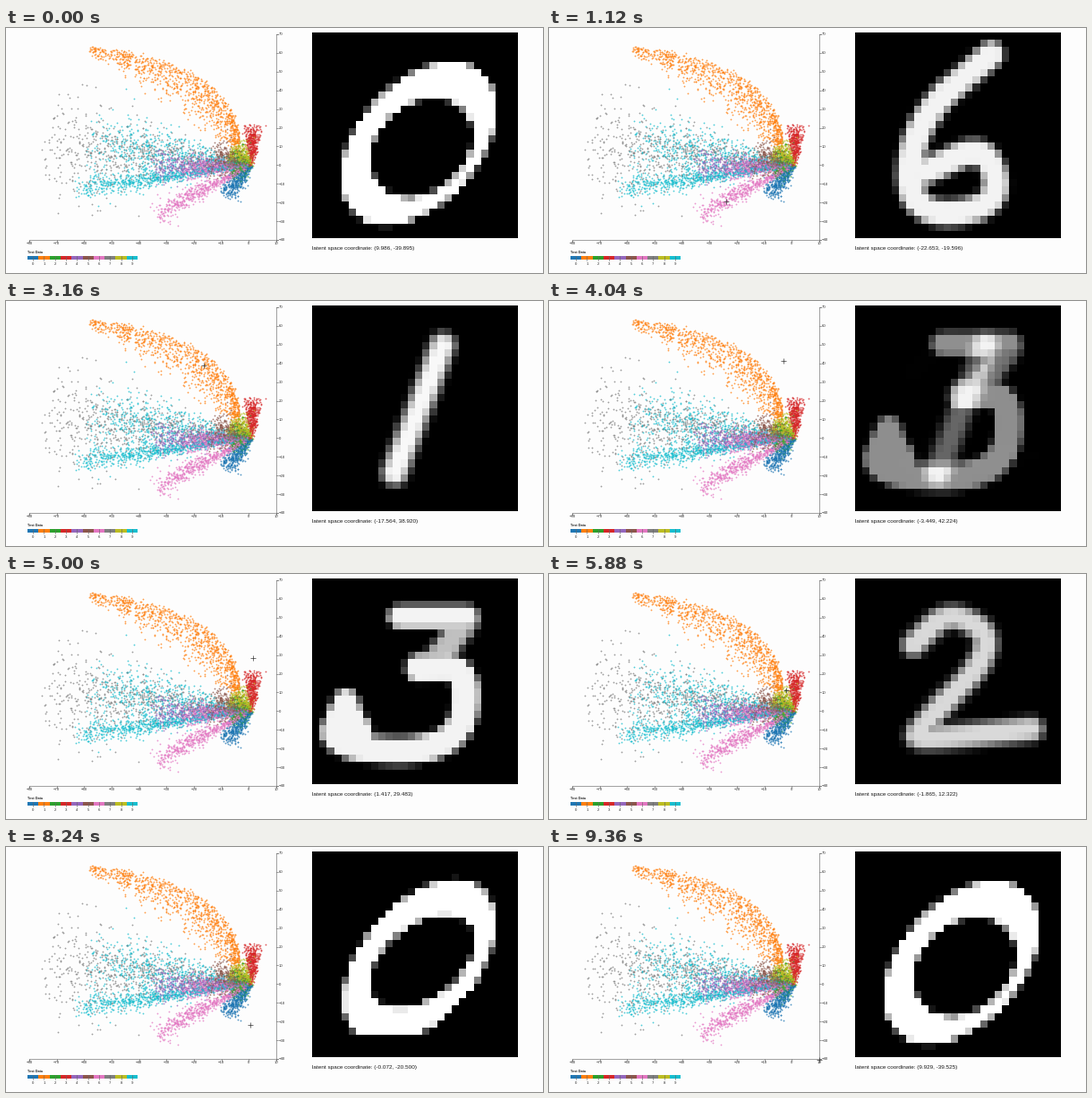
A matplotlib script for the animation above (9400 ms loop, 600x274 px).

```python
import numpy as np
import matplotlib.pyplot as plt
from matplotlib.animation import FuncAnimation
from matplotlib.patches import Rectangle

W, H, DPI = 600, 274, 64
STEP, LOOP = 40, 9400
PX = 72 / DPI
INK = "#2b2b2b"
COLORS = [plt.cm.tab10(d) for d in range(10)]

plt.rcParams["font.family"] = "Liberation Sans"
rng = np.random.default_rng(7)

fig = plt.figure(figsize=(W / DPI, H / DPI), dpi=DPI, facecolor="#fdfdfd")
ax = fig.add_axes([0, 0, 1, 1])
ax.axis("off")


def px(x):
    return 26 + (x + 80) * 276 / 90


def py(y):
    return 237 - (y + 40) * 230 / 110


def line(xs, ys):
    ax.plot(xs, ys, color="#666666", lw=0.6 * PX)


def label(x, y, text, size=4.3, color=INK, **kw):
    return ax.text(x, y, text, fontsize=size * PX, color=color, **kw)


# ---------- scatter plot ----------
def fan(angle, spread, reach):
    """Cloud that radiates leftwards from the dense core; angle in degrees."""
    n = int(300 + 1.6 * reach)
    a = np.radians(rng.normal(angle, spread, n))
    r = reach * rng.beta(1.6, 1.4, n)
    pts = np.column_stack([274 - r * np.cos(a), 153 - r * np.sin(a)])
    return pts + rng.normal(0, 1.2, (n, 2))


def arch(n):
    """Cloud below a quadratic curve, densest along its outer edge."""
    t = rng.beta(1.1, 1.2, n)[:, None]
    edge = (1 - t) ** 2 * [94, 22] + 2 * t * (1 - t) * [262, 38] + t ** 2 * [260, 132]
    depth = (5 + 200 * t * (1 - t)) * rng.beta(1, 2.3, (n, 1))
    return edge + depth * [-0.5, 0.85] + rng.normal(0, 1.2, (n, 2))


clouds = [(1, arch(1000))] + [
    (digit, fan(angle, spread, reach)) for digit, angle, spread, reach in [
        (0, -50, 9, 46), (2, 5, 28, 27), (3, 92, 8, 46), (4, -1, 6, 112),
        (5, 12, 16, 50), (6, -27, 3.5, 122), (6, -4, 5, 80), (7, 5, 7.5, 235),
        (8, 45, 20, 30), (9, 7, 8, 185), (9, -8, 2, 200)]]

# A few shuffled layers per class let the colours interleave.
LAYERS = 5
for layer in range(LAYERS):
    for k in rng.permutation(len(clouds)):
        digit, pts = clouds[k]
        x, y = pts[layer::LAYERS].T
        ax.plot(x, y, "o", ms=1.8 * PX, mew=0, color=COLORS[digit], alpha=0.75)

line([26, 26, 302, 302], [239, 237, 237, 239])
line([304, 302, 302, 304], [7, 7, 237, 237])
for v in range(-80, 11, 10):
    line([px(v)] * 2, [237, 239])
    label(px(v), 241.4, str(v).replace("-", "\u2212"), ha="center", va="center")
for v in range(-40, 71, 10):
    line([302, 304], [py(v)] * 2)
    label(305, py(v), str(v).replace("-", "\u2212"), va="center_baseline")

label(24, 252.3, "Test Data", 3.9, weight="bold")
CELL = 12.3
for d, c in enumerate(COLORS):
    x = 24 + d * CELL
    ax.add_patch(Rectangle((x, 254.5), CELL, 4, fc=c, ec="none"))
    line([x + CELL / 2] * 2, [254.5, 260])
    label(x + CELL / 2, 263.6, str(d), ha="center", va="center")

# ---------- decoded digits ----------
N, SUB = 28, 4
row, col = np.mgrid[0:N, 0:N] + 0.5
fine_y, fine_x = (np.mgrid[0:N * SUB, 0:N * SUB] + 0.5) / SUB


def oval(cx, cy, a, b, lean):
    u, v = (fine_x - cx) / a, (cy - fine_y) / b
    inside = u * u + v * v - 2 * lean * u * v < 1 - lean * lean
    return inside.reshape(N, SUB, N, SUB).mean(axis=(1, 3))


def ring(outer, hole, floor):
    return np.clip((oval(*outer) - oval(*hole) - 0.2) / 0.6, 0, 1) * (row < floor)


def curve(points, rounds=3):
    """Round the corners of a polyline by repeated corner cutting."""
    p = np.array(points, float)
    for _ in range(rounds):
        a, b = p[:-1], p[1:]
        cut = np.stack([0.75 * a + 0.25 * b, 0.25 * a + 0.75 * b], axis=1)
        p = np.vstack([p[:1], cut.reshape(-1, 2), p[-1:]])
    return p


def stroke(points, half=1.0, soft=1.5, level=0.95):
    dist = np.full((N, N), 99.0)
    path = curve(points)
    for (x0, y0), (x1, y1) in zip(path, path[1:]):
        dx, dy = x1 - x0, y1 - y0
        t = np.clip(((col - x0) * dx + (row - y0) * dy) / (dx * dx + dy * dy), 0, 1)
        dist = np.minimum(dist, np.hypot(col - x0 - t * dx, row - y0 - t * dy))
    s = np.clip((half + soft - dist) / soft, 0, 1)
    return level * s * s * (3 - 2 * s)


def ink(*layers):
    return np.maximum.reduce(layers)


zero = ring((14.5, 15.1, 10.6, 11.1, 0.42), (14.9, 15.7, 7, 6.7, 0.25), N)
tilted = ring((14.6, 15, 10.4, 11.2, 0.47), (15, 15, 7.1, 6.3, 0.45), 25)
six = stroke([(18.5, 3), (8, 12), (7, 25), (20, 24), (18, 15), (9.5, 19)])
seven = ink(stroke([(8.5, 12), (10, 8.8), (19.5, 8.6), (18.2, 16)], 0.7, 1.9, 0.75),
            stroke([(18.4, 11), (17.3, 19), (15.9, 26)], 0.8, 1.7),
            stroke([(4, 10), (18, 8.5)], 1.5, 1.8, 0.3),
            stroke([(9, 13), (15.5, 16)], 1, 2, 0.14))
one = stroke([(17.8, 5.4), (11.2, 22.8)], 0.55, 2.1, 0.97)
three = ink(stroke([(12, 5.2), (21, 5.2)], 1, 1.2),
            stroke([(20.8, 6), (16.6, 11.5)], 0.9, 1.6, 0.75),
            stroke([(14.5, 12.2), (21.5, 12), (20, 23.7), (2, 23.2), (4.6, 17)], 1.3, 1.1),
            stroke([(4.7, 18.5), (6, 21)], 1.7, 1))
two = stroke([(8, 9), (13, 4), (20, 9), (8, 21), (9, 22), (24, 20.5)], 0.6, 1.9, 0.85)
loop = [(21, 8), (10, 7), (7, 17), (14, 17), (20, 9)]
stem = [(21.3, 8), (18, 16), (14.6, 24.3)]
nine = ink(stroke(loop, 0.3, 2.4, 0.66), stroke(stem, 0.5, 2.6, 0.78),
           stroke(loop, 1.2, 3.5, 0.24), stroke(stem, 1.2, 3.5, 0.24))

# ---------- route through latent space ----------
stops = [(0, 9.986, -39.895, zero), (1100, -22, -20, six), (2000, -52.873, -0.209, seven),
         (3160, -17.564, 38.920, one), (5000, 1.417, 29.483, three), (5900, -2, 12, two),
         (6720, -9.776, 1.680, nine), (8240, -0.072, -20.5, tilted),
         (9360, 9.929, -39.525, zero), (LOOP, 9.986, -39.895, zero)]
times = np.array([s[0] for s in stops], float)
spots = np.array([s[1:3] for s in stops])
glyphs = np.array([s[3] for s in stops])
slopes = np.gradient(spots, times, axis=0)


def latent(ms):
    i = min(np.searchsorted(times, ms, "right") - 1, len(times) - 2)
    h = times[i + 1] - times[i]
    s = (ms - times[i]) / h
    return ((1 + 2 * s) * (1 - s) ** 2 * spots[i] + s * (1 - s) ** 2 * h * slopes[i]
            + s * s * (3 - 2 * s) * spots[i + 1] + s * s * (s - 1) * h * slopes[i + 1])


def decode(spot):
    """Blend the digits by their closeness to a latent point."""
    near = 1 / (((spots - spot) ** 2).sum(axis=1) + 1e-6) ** 3
    return np.tensordot(near / near.sum(), glyphs, 1)


picture = ax.imshow(zero, cmap="gray", vmin=0, vmax=1, interpolation="nearest",
                    aspect="auto", extent=(341.6, 571, 235, 5.5))
caption = label(341.8, 248.2, "", 6.4, "#1a1a1a")
pointer, = ax.plot([], [], "+", ms=5.5 * PX, mew=0.7 * PX, color="#3a3a3a", zorder=5)
ax.set_xlim(0, W)
ax.set_ylim(H, 0)


def draw(i):
    spot = latent(i * STEP)
    picture.set_data(decode(spot))
    caption.set_text("latent space coordinate: ({:.3f}, {:.3f})".format(*spot))
    # The pointer runs one step ahead of the read-out.
    x, y = latent((i + 1) * STEP)
    pointer.set_data([px(x) + 0.5], [py(y) + 1.5])
    pointer.set_visible(i > 0)
    return picture, caption, pointer


anim = FuncAnimation(fig, draw, frames=LOOP // STEP, interval=STEP,
                     repeat=True, repeat_delay=0, blit=False)
plt.show()
```
